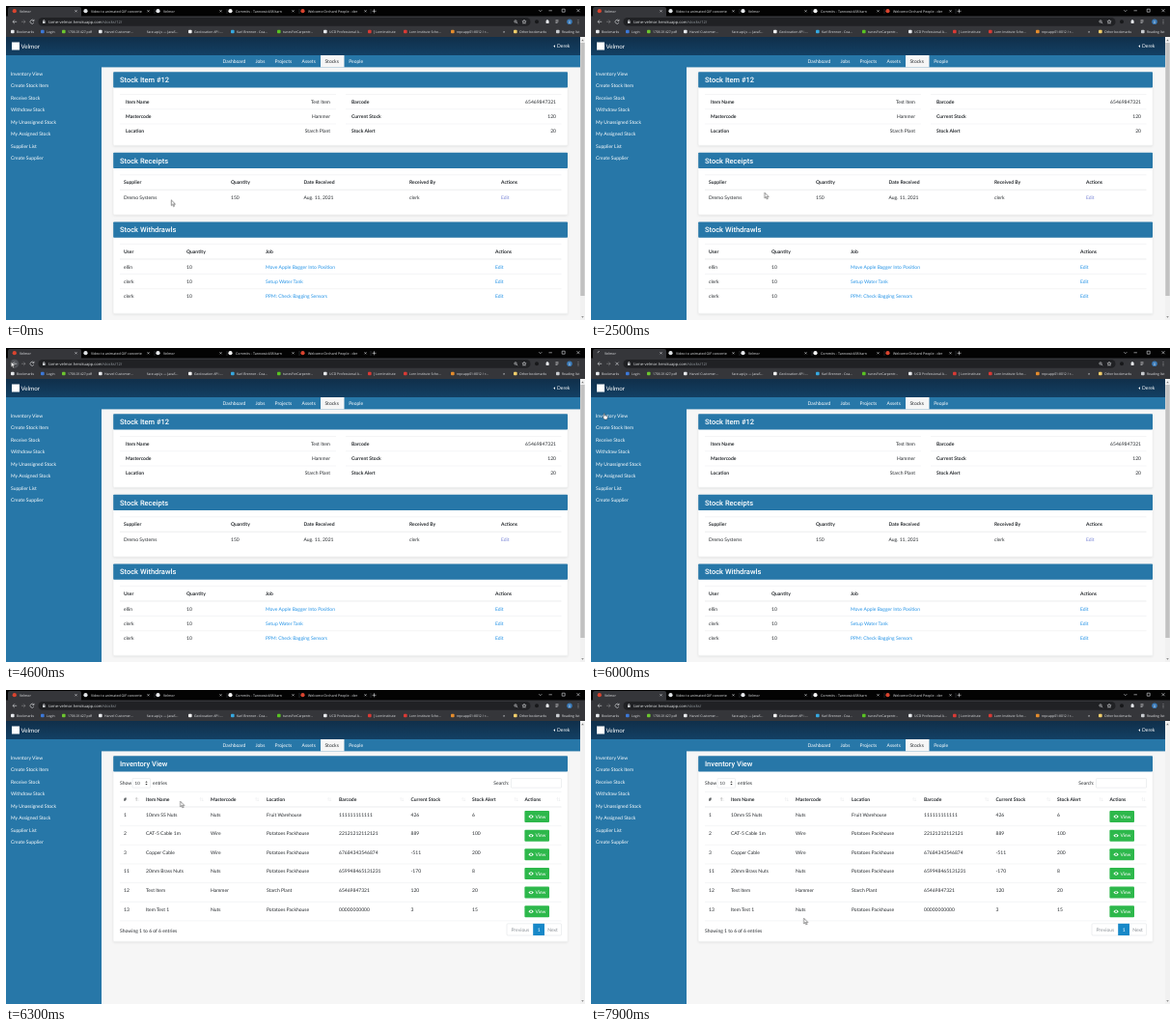
An HTML page that plays this animation: 600x325 px, repeating every 8000 ms.

```html
<!DOCTYPE html>
<html lang="en">
<head>
<meta charset="utf-8">
<title>Stock inventory</title>
<style>
html, body { margin: 0; width: 100%; height: 100%; overflow: hidden; background: #f6f6f6; }
svg { display: block; width: 100vw; height: 100vh; }
text { font-family: Lato, sans-serif; fill: #25292d; text-rendering: geometricPrecision; white-space: pre; }
.ui { font-family: "Open Sans", "Noto Sans", sans-serif; fill: #e4e6e8; }
.title { font-family: Roboto, sans-serif; font-weight: 500; fill: #fff; }
.bold { font-weight: 700; }
.white { fill: #fff; }
.grey { fill: #8a9096; }
.link { fill: #2493e6; }
.visited { fill: #7a86d6; }
.end { text-anchor: end; }
.mid { text-anchor: middle; }
.line { fill: none; stroke: #e4e5e7; stroke-width: .4; }
.icon { fill: none; stroke: #dfe1e4; stroke-width: .6; }

.item, .raw, .table, .loading, .idle, .favicon, .spinner, .hand, .arrow, .hover { animation: 8s step-end infinite; }
.item { animation-name: item; }
.raw { animation-name: raw; }
.table { animation-name: table; }
.loading { animation-name: loading; }
.idle { animation-name: idle; }
.favicon { animation-name: favicon; }
.spinner { animation-name: spinner; }
.hand { animation-name: hand; }
.arrow { animation-name: arrow; }
.hover { animation-name: hover; }
@keyframes item { 0% { opacity: 1 } 76.25%, 100% { opacity: 0 } }
@keyframes raw { 0% { opacity: 0 } 76.25% { opacity: 1 } 77.5%, 100% { opacity: 0 } }
@keyframes table { 0% { opacity: 0 } 77.5%, 100% { opacity: 1 } }
@keyframes loading { 0% { opacity: 0 } 73.75% { opacity: 1 } 78.75%, 100% { opacity: 0 } }
@keyframes idle { 0% { opacity: 1 } 73.75% { opacity: 0 } 78.75%, 100% { opacity: 1 } }
@keyframes spinner { 0% { opacity: 0 } 73.75% { opacity: 1 } 76.25%, 100% { opacity: 0 } }
@keyframes favicon { 0% { opacity: 1 } 73.75% { opacity: 0 } 76.25%, 100% { opacity: 1 } }
@keyframes hand { 0% { opacity: 0 } 67.5% { opacity: 1 } 77.5%, 100% { opacity: 0 } }
@keyframes arrow { 0% { opacity: 1 } 67.5% { opacity: 0 } 77.5%, 100% { opacity: 1 } }
@keyframes hover { 0% { opacity: 0 } 56.25% { opacity: 1 } 62.5%, 100% { opacity: 0 } }

/* The pointer advances every 100 ms, which is 1.25% of the loop. */
.pointer { animation: pointer 8s step-end infinite; }
@keyframes pointer {
  0% { transform: translate(171px, 200.6px) }
  3.75% { transform: translate(171px, 200.6px); animation-timing-function: steps(8) }
  13.75% { transform: translate(179px, 193px) }
  31.25% { transform: translate(179.6px, 193px) }
  38.75% { transform: translate(179.8px, 193px) }
  43.75% { transform: translate(179.8px, 193px); animation-timing-function: steps(4) }
  48.75% { transform: translate(110px, 95px); animation-timing-function: steps(5) }
  55% { transform: translate(32px, 19px) }
  56.25% { transform: translate(13px, 16px) }
  57.5% { transform: translate(5px, 14px) }
  61.25% { transform: translate(5px, 14px); animation-timing-function: steps(4) }
  66.25% { transform: translate(11px, 66px); animation-timing-function: steps(2) }
  68.75% { transform: translate(15px, 89px); animation-timing-function: steps(2) }
  71.25% { transform: translate(12px, 67px) }
  76.25% { transform: translate(33px, 72px); animation-timing-function: steps(6) }
  83.75% { transform: translate(475px, 201px) }
  85% { transform: translate(530px, 235px) }
  86.25% { transform: translate(552px, 251px) }
  87.5% { transform: translate(549px, 249px) }
  88.75% { transform: translate(544.5px, 247.5px); animation-timing-function: steps(5) }
  95% { transform: translate(207px, 235.5px) }
  96.25% { transform: translate(201px, 236px) }
  98.75%, 100% { transform: translate(220.3px, 236px) }
}
</style>
</head>
<body>
<script>
const text = (x, y, s, cls = '', size = 5) =>
  `<text class="${cls}" x="${x}" y="${y + size * .36}" font-size="${size}">${s}</text>`;
const rect = (x, y, w, h, fill, rx = 0, extra = '') =>
  `<rect x="${x}" y="${y}" width="${w}" height="${h}" fill="${fill}" rx="${rx}" ${extra}/>`;
const dot = (x, y, r, fill) => `<circle cx="${x}" cy="${y}" r="${r}" fill="${fill}"/>`;
const path = (d, cls = 'icon', extra = '') => `<path class="${cls}" d="${d}" ${extra}/>`;
const rule = (x1, x2, y, extra = '') => path(`M${x1} ${y}H${x2}`, 'line', extra);
const group = (cls, ...parts) => `<g class="${cls}">${parts.flat().join('')}</g>`;
const row = (xs, y, cells, cls = '') => cells.map((s, i) => text(xs[i], y, s, cls));
const cross = (x, y, r) => path(`M${x - r} ${y - r}l${2 * r} ${2 * r}m0 ${-2 * r}l${-2 * r} ${2 * r}`);
const thick = 'style="stroke-width:.7"';
const BLUE = '#2777a8', GREEN = '#2db84b';

function tab(x, title, colour) {
  return [dot(x, 5.2, 2.1, colour), text(x + 5.5, 5.3, title, 'ui', 3.6), cross(x + 65, 5.3, 1)];
}

function browser() {
  const marks = [
    [11, 'Bookmarks', '#e8eaed'], [42, 'Login', '#3c78d8'], [64, '1706.01427.pdf', '#6cc62f'],
    [102, 'Harvel Customer...', '#e8eaed'], [146, 'face-api.js — JavaS...', ''],
    [195, 'Geolocation API -...', '#f4f4f4'], [239, 'Karl Brenner - Coa...', '#35a8e0'],
    [287, 'tunesForCarpentr...', '#58c322'], [335, 'UCD Professional A...', '#e8eaed'],
    [381, '[ LornInstitute', '#d93a35'], [418, 'Lorn Institute Sche...', '#d93a35'],
    [467, 'repcapp01:8012 / r...', '#e58c2c'], [532, 'Other bookmarks', '#f2ce6b'], [576, 'Reading list', '#c9ccd0']
  ];
  return [
    rect(0, 0, 600, 11, '#030303'), rect(0, 10.5, 600, 21.5, '#35363a'),
    rect(2, 1, 76, 11, '#35363a', 2),
    group('favicon', dot(8.8, 5.2, 2.1, '#d9442f')),
    group('spinner', path('M7 5.2a1.8 1.8 0 0 1 1.8 -1.8')),
    text(14, 5.3, 'Velmor', 'ui', 3.6), cross(72.5, 5.3, 1),
    tab(82.5, 'Video to animated GIF converte', '#dfe2e5'), tab(157.5, 'Velmor', '#e8eaed'),
    tab(232.5, 'Commits - Tannowick38/tarn', '#f4f4f4'), tab(307.5, 'Welcome Orchard People - der', '#d9442f'),
    path('M154 3v5M229 3v5M304 3v5M378 3v5', 'line', 'style="stroke:#55575c"'),
    path('M379.5 5.3h4m-2 -2v4'),
    path('M552.3 4.2l1.5 1.5l1.5 -1.5M562.5 4.8h3.4M576.2 3.2h3v3h-3z'), cross(593, 4.7, 1.5),
    group('hover', dot(8.8, 16.3, 4.5, '#505257')),
    path('M11.2 16.3h-4.2m1.9 -1.9l-1.9 1.9l1.9 1.9'),
    path('M16 16.3h4m-1.9 -1.9l1.9 1.9l-1.9 1.9', 'icon', 'opacity=".45"'),
    group('idle', path('M28.8 15.3a2 2 0 1 0 .1 1.8M29 13.8v1.7h-1.7')),
    group('loading', cross(27, 16.3, 1.6)),
    rect(33.5, 12, 510, 8.8, '#202124', 4.4),
    rect(38, 15.8, 2.6, 2.2, '#c9ccd0', .3), path('M38.6 16v-.8a.7 .7 0 0 1 1.4 0v.8'),
    ...['item', 'raw', 'table'].map(c => group(c,
      text(44, 16.4, `tarne-velmor.herokuapp.com<tspan fill="#9aa0a6">/stocks/${c === 'item' ? '12/' : ''}</tspan>`, 'ui', 4.05))),
    `<circle class="icon" cx="528" cy="16" r="1.2"/>`, path('M529 17l1.2 1.2'),
    path('M537 14.3l.6 1.3l1.4 .2l-1 1l.2 1.4l-1.2 -.7l-1.2 .7l.2 -1.4l-1 -1l1.4 -.2z'),
    dot(550, 16.3, 2, '#17181a'), rect(559.6, 15, 3, 3, '#e8eaed', .6), dot(561, 14.8, .8, '#e8eaed'),
    path('M569.5 14.8h3m-3 1.3h3m-3 1.3h2'), dot(584, 16.3, 2.8, '#3979b7'), text(584, 16.3, 'D', 'ui mid', 3.4),
    dot(593, 14.6, .45, '#e8eaed'), dot(593, 16.3, .45, '#e8eaed'), dot(593, 18, .45, '#e8eaed'),
    marks.map(([x, s, c]) => (c ? rect(x - 6, 24.7, 3.6, 3.6, c, .8) : '') + text(x, 26.6, s, 'ui', 3.45)),
    text(515, 26.3, '»', 'ui', 4.5)
  ];
}

function frame() {
  const nav = [[224.5, 'Dashboard'], [258.5, 'Jobs'], [278.5, 'Projects'], [306.5, 'Assets'], [330.5, 'Stocks'], [355.2, 'People']];
  const side = ['Inventory View', 'Create Stock Item', 'Receive Stock', 'Withdraw Stock',
    'My Unassigned Stock', 'My Assigned Stock', 'Supplier List', 'Create Supplier'];
  return [
    rect(0, 32, 595, 19, 'url(#header)'), rect(0, 51, 595, 12.4, BLUE), rect(0, 63, 99, 262, BLUE),
    rect(6, 37.5, 8, 8, '#fff'), text(15.5, 41.5, 'Velmor', 'white', 6.25),
    path('M569 40.3v2.6l-1.7 -1.3z', 'white'), text(571, 41.6, 'Derek', 'white'),
    rect(326, 51, 24.5, 12.4, '#f6f6f6'),
    nav.map(([x, s]) => text(x, 57.3, s, s === 'Stocks' ? '' : 'white')),
    side.map((s, i) => text(5, 70 + i * 12.5, s, 'white')),
    rect(595, 32, 5, 293, '#f1f1f1'),
    path('M596.2 36.2l1.3 -1.6l1.3 1.6zM596.2 321.2l1.3 1.6l1.3 -1.6z', '', 'fill="#777"')
  ];
}

function card(y, bottom, title) {
  return [
    rect(111.2, y, 470.8, bottom - y, '#fff', 1, 'filter="url(#shadow)" stroke="#e1e2e3" stroke-width=".3"'),
    rect(111.2, y, 470.8, 16.4, BLUE, .8), text(118, y + 8.3, title, 'title', 7.5)
  ];
}

function itemPage() {
  const details = [
    ['Item Name', 'Test Item', 'Barcode', '65469847321'],
    ['Mastercode', 'Hammer', 'Current Stock', '120'],
    ['Location', 'Starch Plant', 'Stock Alert', '20']
  ];
  const receipts = [122, 233, 308.5, 418, 513], jobs = [122, 187, 269, 507];
  const withdrawals = [['ellin', 'Move Apple Bagger Into Position'], ['clerk', 'Setup Water Tank'], ['clerk', 'PPM: Check Bagging Sensors']];
  return [
    card(68.2, 144.3, 'Stock Item #12'),
    details.map(([a, b, c, d], i) => {
      const y = 99 + i * 15.25;
      return [text(124, y, a, 'bold'), text(336, y, b, 'end'), text(358, y, c, 'bold'), text(570, y, d, 'end'),
        rule(118, 342, y - 7.5), rule(352, 575.5, y - 7.5)].join('');
    }),
    card(151.7, 216, 'Stock Receipts'),
    row(receipts, 182.4, ['Supplier', 'Quantity', 'Date Received', 'Received By', 'Actions'], 'bold'),
    rule(118, 575.5, 174.8), rule(118, 575.5, 190.2, thick),
    row(receipts, 198, ['Dremo Systems', '150', 'Aug. 11, 2021', 'clerk']), text(513, 198, 'Edit', 'visited'),
    card(223.4, 318.2, 'Stock Withdrawls'),
    row(jobs, 254, ['User', 'Quantity', 'Job', 'Actions'], 'bold'),
    rule(118, 575.5, 246.4), rule(118, 575.5, 262, thick),
    withdrawals.map(([user, job], i) => {
      const y = 269.7 + i * 15.3;
      return row(jobs, y, [user, '10']).join('') + text(269, y, job, 'link') + text(507, y, 'Edit', 'link') +
        (i ? rule(118, 575.5, y - 7.6) : '');
    }),
    rect(595.3, 38, 4.4, 262, '#c1c1c1')
  ];
}

const heads = ['#', 'Item Name', 'Mastercode', 'Location', 'Barcode', 'Current Stock', 'Stock Alert', 'Actions'];
const stock = [
  ['2', 'CAT-5 Cable 1m', 'Wire', 'Potatoes Packhouse', '22121212112121', '889', '100'],
  ['3', 'Copper Cable', 'Wire', 'Potatoes Packhouse', '67684343546874', '-511', '200'],
  ['11', '20mm Brass Nuts', 'Nuts', 'Potatoes Packhouse', '659948465131231', '-170', '8'],
  ['1', '10mm SS Nuts', 'Nuts', 'Fruit Warehouse', '111111111111', '426', '6'],
  ['12', 'Test Item', 'Hammer', 'Starch Plant', '65469847321', '120', '20'],
  ['13', 'Item Test 1', 'Nuts', 'Potatoes Packhouse', '00000000000', '3', '15']
];

function stockRows(xs, top, rows, withEye) {
  const x = xs[7];
  const eye = path(`M${x + 4} 0q2.7 -3.4 5.4 0q-2.7 3.4 -5.4 0z`, 'white') + dot(x + 6.7, 0, 1, GREEN);
  return [
    row(xs, top - 7.8, heads, 'bold'), rule(118, 575.5, top - 15.6), rule(118, 575.5, top, thick),
    rows.map((cells, i) => {
      const y = top + i * 19.65;
      return (i ? rule(118, 575.5, y) : '') + row(xs, y + 7.7, cells).join('') +
        rect(x, y + 4, withEye ? 25.6 : 19.3, 12, GREEN, 1) +
        (withEye ? `<g transform="translate(0 ${y + 10})">${eye}</g>` : '') +
        text(x + (withEye ? 11 : 4.3), y + 10, 'View', 'white');
    })
  ];
}

const rawPage = () => [
  card(68.2, 236.5, 'Inventory View'),
  stockRows([122, 142, 214.5, 267.5, 348.3, 428, 488, 538], 107, stock, false)
];

function tablePage() {
  const sorted = [...stock].sort((a, b) => a[0] - b[0]);
  const sorter = (x, i) => path(`M${x - .8} 115v-3.4m-.8 .9l.8 -.9l.8 .9`, 'line', i ? '' : 'style="stroke:#777"') +
    path(`M${x + 1.2} 111.6v3.4m-.8 -.9l.8 .9l.8 -.9`, 'line');
  const field = 'stroke="#cfd3d7" stroke-width=".35"';
  return [
    card(68.2, 260.2, 'Inventory View'),
    text(118, 96.3, 'Show'), rect(131, 91.6, 18.5, 9.6, '#fff', .7, field), text(133.6, 96.4, '10', '', 4.4),
    path('M144.4 95.8l1.1 -1.6l1.1 1.6zM144.4 97l1.1 1.6l1.1 -1.6z', '', 'fill="#333"'), text(152, 96.3, 'entries'),
    text(521.3, 96.3, 'Search:', 'end'), rect(523.5, 91.6, 52, 9.6, '#fff', .7, field),
    stockRows([122, 145, 212, 270, 345, 419.5, 483, 537.4], 121, sorted, true),
    [136, 202.5, 260, 335, 410, 474, 528.5, 572.3].map(sorter),
    rule(118, 575.5, 238.9),
    text(118, 249.6, 'Showing 1 to 6 of 6 entries'),
    rect(519, 241.8, 56.5, 12.2, '#fff', 1, field), rect(546.2, 241.8, 11.8, 12.2, '#1788c8'),
    text(532.8, 248, 'Previous', 'grey mid'), text(552.1, 248, '1', 'white mid'), text(566.6, 248, 'Next', 'grey mid')
  ];
}

const pointer = () => group('pointer',
  group('arrow', path('M.3 .2v5.7l1.3 -1.2l1 2.2l1 -.45l-1 -2.1h1.9z', '', 'fill="#fff" stroke="#111" stroke-width=".45"')),
  group('hand', path('M1.2 3.8V.8q.5 -.7 1 0v2l2.6 .7q.5 .3 .4 1l-.5 2.4h-2.7l-1.6 -2q-.2 -.9 .8 -.5z', '', 'fill="#fff" stroke="#111" stroke-width=".4"')));

document.body.innerHTML = `<svg viewBox="0 0 600 325" preserveAspectRatio="none">
  <defs>
    <linearGradient id="header" x2="0" y2="1"><stop stop-color="#102f4a"/><stop offset="1" stop-color="#134064"/></linearGradient>
    <filter id="shadow" x="-2%" y="-5%" width="104%" height="115%"><feDropShadow dx="0" dy=".8" stdDeviation="1" flood-opacity=".1"/></filter>
  </defs>
  ${rect(0, 0, 600, 325, '#f6f6f6')}
  ${group('', browser(), frame())}
  ${group('item', itemPage())}
  ${group('raw', rawPage().flat())}
  ${group('table', tablePage().flat())}
  ${pointer()}
</svg>`.replace(/>,+</g, '><');
</script>
</body>
</html>
```
